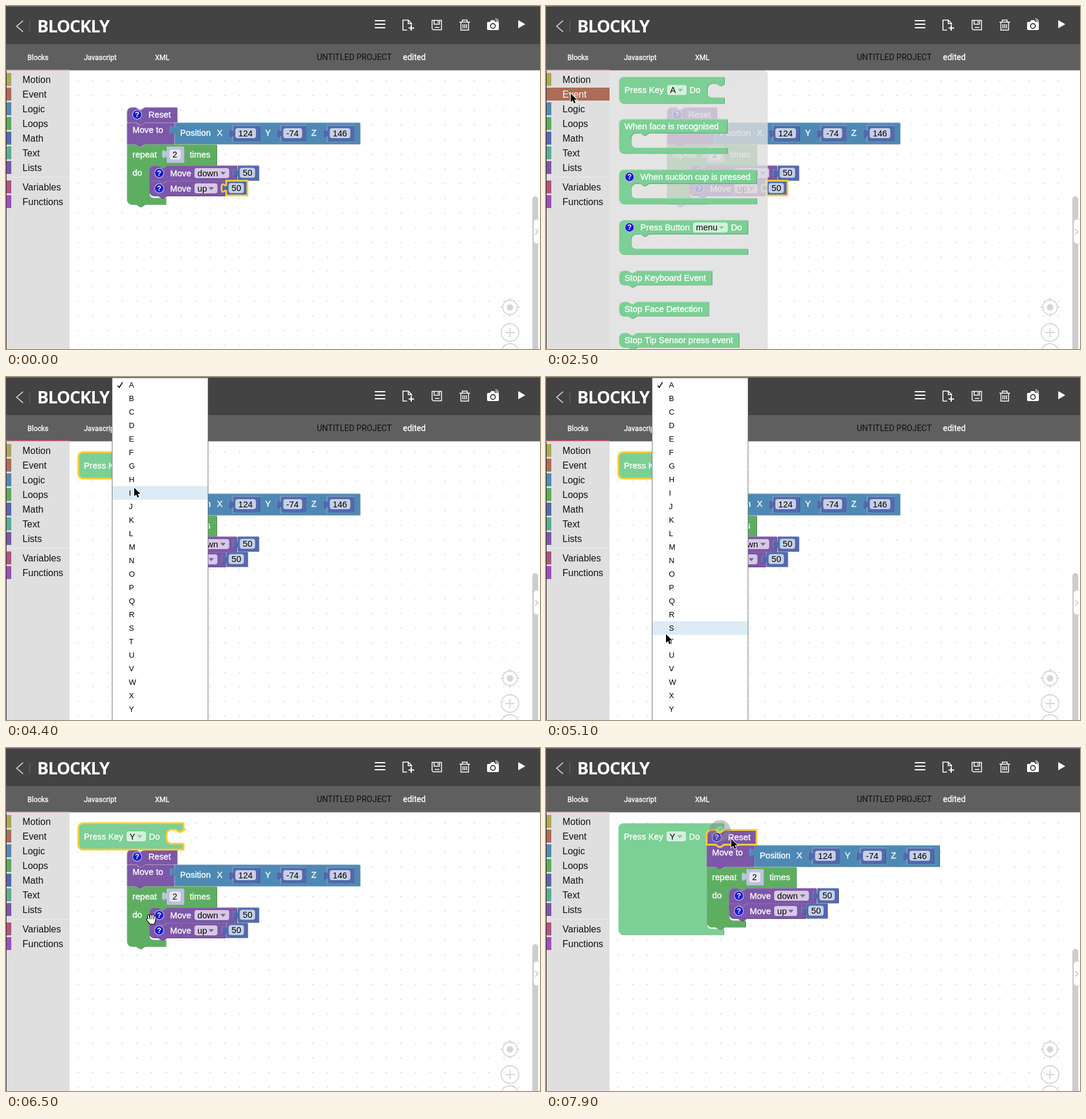
Animation of 908x584 px, one loop 8000 ms. Source, as an HTML page with a canvas:

```html
<!DOCTYPE html>
<html lang="en">
<head>
<meta charset="utf-8">
<title>Block editor</title>
<style>
html, body { margin: 0; width: 100%; height: 100%; overflow: hidden; background: #fff; }
canvas { display: block; width: 908px; height: 584px; }
</style>
</head>
<body>
<canvas id="stage" width="908" height="584"></canvas>
<script>
const ctx = document.getElementById('stage').getContext('2d');
const W = 908, H = 584, LOOP = 8000;
const SANS = '"Liberation Sans", Arial, sans-serif';
const ROBOTO = 'Roboto, sans-serif';
const BLOCK = `14.67px ${SANS}`;
const PURPLE = '#7d57a8', BLUE = '#4d89b4', GREEN = '#5eae62', MATH = '#5169ae', EVENT = '#7ccf95', GOLD = '#fc3';

// Moments, in ms
const T = { show: 100, flyout: 2000, grab: 3100, drop: 3300, menu: 4100, pick: 6100, lift: 7200, snap: 7822 };
// Pointer stops: time, x, y
const STOPS = [[100, 300, 440], [900, 150, 318], [1500, 42, 149], [2500, 42, 149], [3100, 254, 145],
  [3300, 252, 153], [3600, 252, 153], [3950, 222, 151], [4200, 220, 152], [5100, 204, 438], [5400, 204, 466],
  [5800, 206, 561], [6300, 206, 561], [6500, 247, 291], [6850, 247, 188], [7200, 247, 188], [7750, 315, 155], [8000, 315, 155]];

function pointer(t) {
  const i = STOPS.findIndex(s => s[0] > t);
  const [a, b] = i < 1 ? [STOPS[0], STOPS[0]] : [STOPS[i - 1], STOPS[i]];
  const p = b === a ? 0 : (t - a[0]) / (b[0] - a[0]);
  const k = p * p * (3 - 2 * p);
  return { x: a[1] + (b[1] - a[1]) * k, y: a[2] + (b[2] - a[2]) * k };
}

function box(x, y, w, h, color) {
  ctx.fillStyle = color;
  ctx.fillRect(x, y, w, h);
}
function pillBox(x, y, w, h, r, color) {
  ctx.fillStyle = color;
  ctx.beginPath();
  ctx.roundRect(x, y, w, h, r);
  ctx.fill();
}
function text(s, x, y, color = '#fff', font = BLOCK) {
  ctx.font = font;
  ctx.fillStyle = color;
  ctx.fillText(s, x, y);
}
// White labels get a hairline to look a little heavier
function label(s, x, y, font = BLOCK) {
  text(s, x, y, '#fff', font);
  ctx.strokeStyle = '#fff';
  ctx.lineWidth = 0.35;
  ctx.strokeText(s, x, y);
}
function line(d, color, width = 1) {
  ctx.strokeStyle = color;
  ctx.lineWidth = width;
  ctx.stroke(new Path2D(d));
}
function solid(d, color) {
  ctx.fillStyle = color;
  ctx.fill(new Path2D(d));
}
function disc(x, y, r, fill, stroke, width = 1) {
  ctx.beginPath();
  ctx.arc(x, y, r, 0, 7);
  if (fill) { ctx.fillStyle = fill; ctx.fill(); }
  if (stroke) { ctx.strokeStyle = stroke; ctx.lineWidth = width; ctx.stroke(); }
}
function at(x, y, draw) {
  ctx.save();
  ctx.translate(x, y);
  draw();
  ctx.restore();
}

// Outline of a block; mouth = { edge, top, gap, foot }
function outline(w, h, { tl, bl, prev, next, tab, mouth } = {}) {
  let d = tl ? 'M0 8A8 8 0 0 1 8 0' : 'M0 0';
  if (prev) d += 'H15l6 4 3 0 6-4';
  d += `H${w}`;
  if (mouth) d += `V${mouth.top}H${mouth.edge + 30}l-6 4-3 0-6-4h-7a8 8 0 0 0-8 8v${mouth.gap - 16}a8 8 0 0 0 8 8H${mouth.foot}`;
  d += `V${h}`;
  if (next) d += 'H30l-6 4-3 0-6-4';
  d += bl ? 'H8a8 8 0 0 1-8-8' : 'H0';
  if (tab) d += 'V20c0-10-8 8-8-7.5s8 2.5 8-7.5';
  return new Path2D(d + 'Z');
}
function shade(color, mix) {
  return `color-mix(in srgb, ${color} 78%, ${mix})`;
}
function glow(path) {
  ctx.strokeStyle = GOLD;
  ctx.lineWidth = 3;
  ctx.stroke(path);
}
function block(x, y, path, color, selected) {
  at(x, y, () => {
    ctx.fillStyle = shade(color, '#000');
    at(1, 1, () => ctx.fill(path));
    ctx.fillStyle = shade(color, '#fff');
    ctx.fill(path);
    ctx.save();
    ctx.clip(path);
    ctx.translate(1, 1);
    ctx.fillStyle = color;
    ctx.fill(path);
    ctx.restore();
    if (selected) glow(path);
  });
}
function field(x, y, w, s, color) {
  pillBox(x, y, w, 17, 4, 'rgba(255,255,255,.68)');
  text(s, x + 5, y + 13.5, '#000');
  if (color) solid(`M${x + w - 15} ${y + 6.5}h9l-4.5 5z`, color);
}
function number(x, y, w, h, s, selected) {
  block(x, y, outline(w, h, { tab: true }), MATH, selected);
  field(x + 4, y + h / 2 - 8.5, w - 10, s);
}
function help(x, y) {
  disc(x, y, 7.8, '#1a1ad0', '#b9b9ee', 1.2);
  ctx.textAlign = 'center';
  text('?', x, y + 4.2, '#fff', `bold 12px ${SANS}`);
  ctx.textAlign = 'left';
}

const RESET = outline(85, 25, { tl: true, prev: true, next: true });

function moveRow(y, w, dir, fieldW, valueX, last, selected) {
  block(37.5, y, outline(w, 25.5, { prev: true, next: true, tl: !last, bl: last }), PURPLE);
  help(55, y + 13);
  label('Move', 73.5, y + 18);
  field(115, y + 4.5, fieldW, dir, PURPLE);
  number(valueX, y, 36, 25, '50', selected);
}

function stack(x, y, glowTop, glowValue) {
  at(x, y, () => {
    block(0, 0, RESET, PURPLE);
    help(17.5, 12.5);
    label('Reset', 36.5, 17);

    block(0, 26, outline(80, 37, { prev: true, next: true }), PURPLE);
    label('Move to', 9.5, 43.5);
    block(81, 26, outline(315, 36, { tab: true }), BLUE);
    label('Position', 90.5, 48.5);
    [['X', 153, 180.5, 45, '124'], ['Y', 235, 262, 42, '-74'], ['Z', 313.5, 341, 45, '146']].forEach(([s, lx, nx, w, v]) => {
      label(s, lx, 48.5);
      ctx.strokeStyle = 'rgba(255,255,255,.25)';
      ctx.lineWidth = 1;
      ctx.strokeRect(nx - 1, 30.5, w + 1.5, 28);
      number(nx, 31, w, 26, v);
    });

    const mouth = { edge: 37.5, top: 36, gap: 55, foot: 66 };
    block(0, 63, outline(152.5, 102, { prev: true, next: true, bl: true, mouth }), GREEN);
    label('repeat', 9.5, 85);
    block(68, 67, outline(29, 27, { tab: true }), '#bcc2dc');
    pillBox(72.5, 72, 19, 17, 4, '#e6e8f3');
    text('2', 77.5, 85.5, '#000');
    label('times', 107, 85);
    label('do', 9.5, 116.5);
    moveRow(99, 149, 'down', 59, 188, false);
    moveRow(125, 130.5, 'up', 39, 169, true, glowValue);
    if (glowTop) glow(RESET);
  });
}

function pressKey(x, y, key, gap, selected) {
  const mouth = { edge: 150, top: 11, gap, foot: 179 };
  block(x, y, outline(179, gap + 21, { tl: true, bl: true, mouth }), EVENT, selected);
  label('Press Key', x + 9.5, y + 27.5);
  field(x + 82, y + 14, 33, key, EVENT);
  label('Do', x + 120, y + 27.5);
}

function flyout() {
  ctx.fillStyle = 'rgba(222,222,222,.8)';
  ctx.beginPath();
  ctx.roundRect(108, 109, 269, 480, [0, 8, 0, 0]);
  ctx.fill();
  const x = 124;
  const cup = (y, w) => block(x, y, outline(w, 58, { tl: true, bl: true, mouth: { edge: 20.5, top: 23.5, gap: 25, foot: w } }), EVENT);
  pressKey(x, 120.5, 'A', 24);
  cup(192.5, 184);
  label('When face is recognised', x + 9.5, 209.5);
  cup(278.5, 234);
  help(142, 291);
  label('When suction cup is pressed', x + 36.5, 295.5);
  cup(364.5, 219);
  help(142, 377);
  label('Press Button', x + 36.5, 381.5);
  field(250, 368.5, 59, 'menu', EVENT);
  label('Do', 314.5, 381.5);
  [['Stop Keyboard Event', 158], ['Stop Face Detection', 152.5], ['Stop Tip Sensor press event', 204]].forEach(([s, w], i) => {
    const y = 450.5 + i * 53;
    block(x, y, outline(w, 24, { tl: true, bl: true, prev: true, next: true }), EVENT);
    label(s, x + 9.5, y + 17);
  });
}

function workspace() {
  box(0, 0, W, H, '#fff');
  for (let i = 0; i < 31; i++)
    for (let j = 0; j < 19; j++) box(121.5 + i * 24.97, 127 + j * 25, 2, 1.2, '#c8c8c8');
}

function controls(barTop) {
  const g = '#d6d6d6';
  disc(857, 513, 12.5, null, g, 1.8);
  disc(857, 513, 5.5, g);
  line('M857 497v5M857 524v5M841 513h5M868 513h5', g, 1.8);
  disc(857, 556, 15, null, g, 1.8);
  line('M857 548v16M849 556h16', g, 1.8);
  disc(857, 590, 15, null, g, 1.8);
  pillBox(895, barTop, 10, 300, 5, '#cdcdcd');
  ctx.beginPath();
  ctx.roundRect(897.5, 363.5, 20, 41, 5);
  ctx.fillStyle = '#fff';
  ctx.fill();
  ctx.strokeStyle = '#e2e2e2';
  ctx.lineWidth = 1;
  ctx.stroke();
  line('M900 380l4.5 4.5-4.5 4.5', '#b4b4b4', 1.1);
}

function header() {
  box(0, 0, W, 65, '#434343');
  box(0, 0, W, 1, '#777');
  box(0, 65, W, 44.5, '#5f5f5f');
  line('M29 25L18 34.5 29 44', '#c8c8c8', 1.7);
  box(40, 25, 1, 19, '#6a6a6a');
  ctx.letterSpacing = '-1px';
  text('BLOCKLY', 53, 45, '#fff', 'bold 29px "Open Sans", sans-serif');
  ctx.letterSpacing = '0px';

  const w = '#fff';
  line('M627 25h18M627 31h18M627 37h18', w, 2);
  line('M682 41h-7V24h9l5.5 5.5v3M684 24v6h5', w, 1.6);
  line('M689 33v9M684.5 37.5h9.5', w, 2);
  line('M724.5 24.5h16v16h-14l-2-2zM728 25v6h9v-6M729 36.5h8M734.5 26v3', w, 1.5);
  line('M771 27.5h18M776 27v-3h8v3M773.5 28v13h13v-13M777 31v7M780 31v7M783 31v7', w, 1.5);
  solid('M820 27h3l2-3h5l2 3h4a2 2 0 0 1 2 2v10a2 2 0 0 1-2 2h-16a2 2 0 0 1-2-2v-10a2 2 0 0 1 2-2z', w);
  disc(828, 34, 4, null, '#434343', 1.8);
  line('M832 24a3 3 0 0 1 3 3M832 21.5a5.5 5.5 0 0 1 5.5 5.5', w, 1.1);
  solid('M871 24l12 7-12 7z', w);

  const tab = `12px ${ROBOTO}`;
  label('Blocks', 36.5, 92, tab);
  label('Javascript', 132.5, 92, tab);
  label('XML', 253.5, 92, tab);
  text('UNTITLED PROJECT', 528.5, 92, '#111', `14px ${ROBOTO}`);
  label('edited', 675, 92, `14px ${ROBOTO}`);
  box(0, 108, 108, 1.5, '#e2527e');
}

const TOOLS = [['Motion', '#aaa955'], ['Event', '#ae6c56'], ['Logic', '#5589b0'], ['Loops', '#58ad5d'], ['Math', '#5568b0'],
  ['Text', '#57ae94'], ['Lists', '#7a57ab'], ['Variables', '#b0557f'], ['Functions', '#9c50bd']];

function sidebar(open) {
  box(0, 109.5, 108, H, '#dfdfdf');
  TOOLS.forEach(([name, color], i) => {
    const y = 114 + i * 25 + (i > 6 ? 8 : 0);
    const on = open && i === 1;
    box(1, y, on ? 107 : 8, 22, color);
    text(name, 28, y + 17, on ? '#fff' : '#111', `16px ${SANS}`);
  });
  box(9, 291, 99, 1, '#ececec');
  box(0, 110, 1, H - 110, '#3a3436');
}

function keyMenu(y) {
  box(180, 1, 164, H, '#777');
  box(181, 2, 162, H, '#fff');
  const hover = Math.floor((y - 2) / 23);
  box(181, 2 + hover * 23, 162, 23, '#dcebf5');
  for (let i = 0; i < 26; i++) text(String.fromCharCode(65 + i), 209, 18 + i * 23, '#000', `13px ${SANS}`);
  line('M190 14.5l2.5 3.5 5.5-9', '#000', 1.5);
}

function arrow() {
  const p = new Path2D('M0 0V14.5L3.4 11.5 5.7 16.8 8.2 15.7 6 10.6H10.6Z');
  ctx.strokeStyle = '#fff';
  ctx.lineWidth = 1.8;
  ctx.stroke(p);
  ctx.fillStyle = '#000';
  ctx.fill(p);
}
function hand(closed) {
  const top = closed ? -3 : -6;
  const fingers = `M-3.5 2L-5 ${top + 1}M-.5 1V${top}M2.5 1L3 ${top}M5.5 2L6.5 ${top + 2.5}M-3 5L-6.5 1`;
  const palm = 'M-4 1H6.5V4L4.5 8.5H-2L-5 4Z';
  ctx.lineCap = ctx.lineJoin = 'round';
  line(fingers, '#000', 4.4);
  line(palm, '#000', 2.6);
  solid(palm, '#fff');
  line(fingers, '#fff', 2.3);
}

function draw(t) {
  const m = pointer(t);
  const placed = t >= T.grab, joined = t >= T.snap, lifted = t >= T.lift;
  const open = t >= T.flyout && t < T.grab;
  const key = t >= T.pick ? 'Y' : 'A';
  const dx = joined ? 67.5 : lifted ? m.x - 247 : 0;
  const dy = joined ? -33 : lifted ? m.y - 188 : 0;
  const keyAt = t < T.drop ? [m.x - 129, m.y - 25] : [123, 128];

  workspace();
  const drawKey = () => placed && pressKey(...keyAt, key, joined ? 168.5 : 24, !lifted);
  const drawStack = () => stack(205.5 + dx, 172.5 + dy, lifted, !placed);
  if (lifted) { drawKey(); drawStack(); } else { drawStack(); drawKey(); }

  const ring = (t - T.snap) / 150;
  if (ring >= 0 && ring < 1) {
    ctx.globalAlpha = 1 - ring;
    disc(296, 141, 25 * ring, null, '#888', 10);
    ctx.globalAlpha = 1;
  }

  controls(joined ? 342 : t >= T.drop ? 334 : 324);
  if (open) flyout();
  header();
  sidebar(open);
  if (t >= T.menu && t < T.pick) keyMenu(m.y);

  if (t < T.show) return;
  const dragging = (t >= T.grab && t < T.drop) || (lifted && !joined);
  const hovering = (t >= 2850 && t < 3750) || (t >= 6420 && t < T.snap);
  at(m.x, m.y, () => dragging || hovering ? hand(dragging) : arrow());
}

function tick() {
  draw(performance.now() % LOOP);
  requestAnimationFrame(tick);
}
tick();
</script>
</body>
</html>
```
